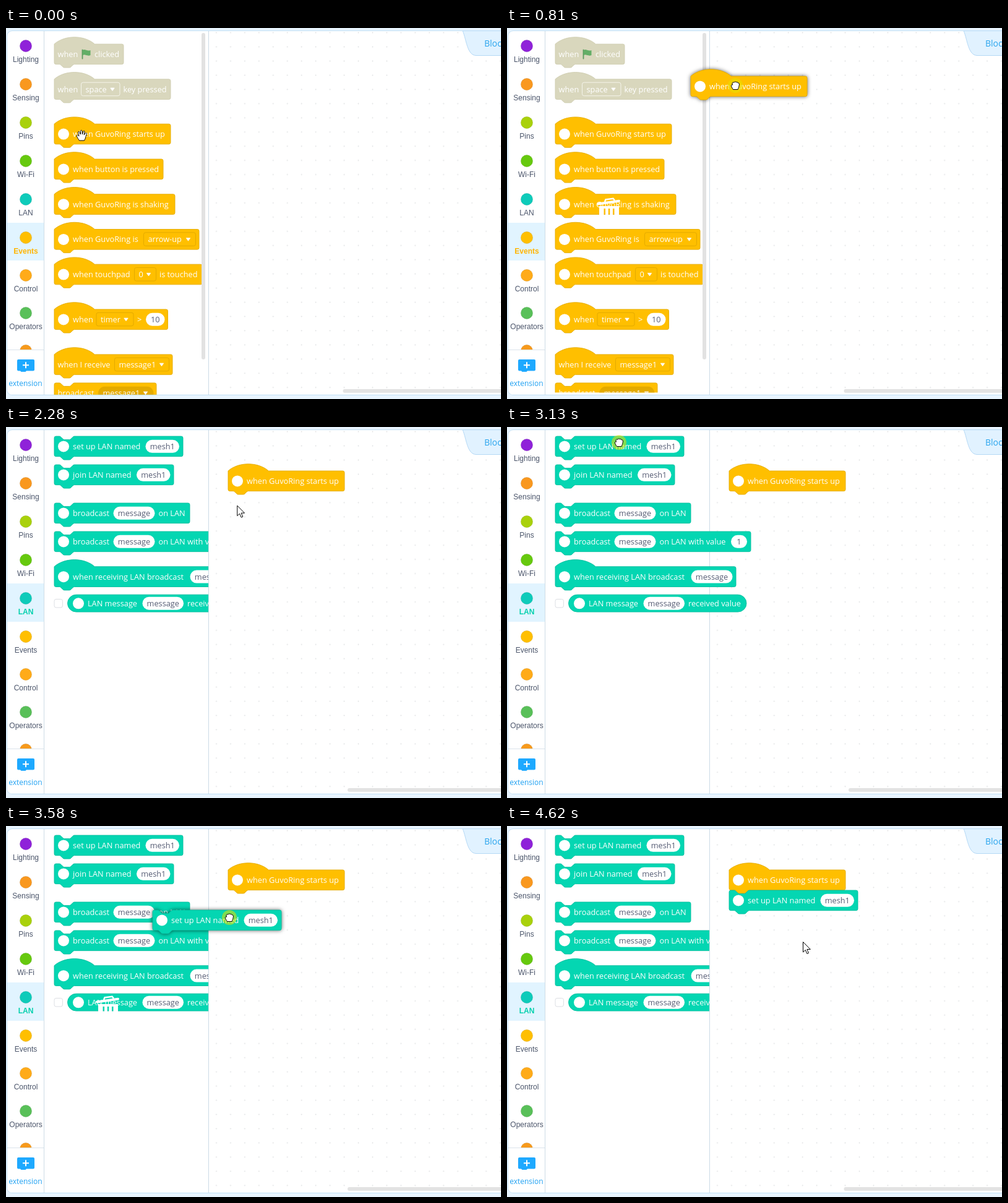
These frames come from a looping animation (800x600 px, 5.1 s). An HTML page:

```html
<!DOCTYPE html>
<html lang="en">
<head>
<meta charset="utf-8">
<title>Block editor</title>
<style>
  html, body { margin: 0; width: 100%; height: 100%; overflow: hidden; background: #e8f4fe; }
  svg { display: block; width: 800px; height: 600px; }
  text { font-family: "Open Sans", "Noto Sans", sans-serif; font-size: 12.75px; white-space: pre; }
  .label { font-family: "Liberation Sans", Arial, sans-serif; font-size: 12px; text-anchor: middle; fill: #4c566b; }
  .lifted { filter: drop-shadow(0 0 3px rgba(0, 0, 0, .6)); }
</style>
</head>
<body>
<svg id="stage" viewBox="0 0 800 600"></svg>
<script>
const LOOP = 5100;
const SCALE = 0.68;
const DEVICE = 'GuvoRing';

const YELLOW = { fill: '#ffbf00', edge: '#e3aa00', field: '#e3aa00' };
const TEAL = { fill: '#04d6b2', edge: '#04bd9d', field: '#04bd9d' };
const FADED = { fill: '#d9d7bd', edge: '#cfccb0', field: '#f5f4ea' };

// ---- block pieces; x values count from the block's left edge ----
const NOTCH_IN = 'H12c2 0 3 1 4 2l4 4c1 1 2 2 4 2h12c2 0 3-1 4-2l4-4c1-1 2-2 4-2';
const NOTCH_OUT = 'H48c-2 0-3 1-4 2l-4 4c-1 1-2 2-4 2h-12c-2 0-3-1-4-2l-4-4c-1-1-2-2-4-2';

function outline(kind, width) {
  const w = width / SCALE;
  if (kind === 'pill') return `M20.5 0H${w - 20.5}a20.5 20.5 0 0 1 0 41H20.5a20.5 20.5 0 0 1 0-41z`;
  const top = kind === 'hat' ? 'M0 0c25-22 71-22 96 0' : 'M0 4A4 4 0 0 1 4 0' + NOTCH_IN;
  return `${top}H${w - 4}a4 4 0 0 1 4 4V44a4 4 0 0 1-4 4${NOTCH_OUT}H4a4 4 0 0 1-4-4z`;
}

const write = (x, s, fill = '#fff') => `<text x="${x}" y="20.8" fill="${fill}">${s}</text>`;
const arrow = x => `<path d="M${x - 3.2} 14.2h6.4l-3.2 4.6z" fill="#fff" stroke="#fff" stroke-width=".8" stroke-linejoin="round"/>`;
const icon = (x = 15) => `<circle cx="${x}" cy="16.4" r="9" fill="#fff"/>`;
const oval = (x, w, s) =>
  `<rect x="${x}" y="5.8" width="${w}" height="21" rx="10.5" fill="#fff"/>` +
  `<text x="${x + w / 2}" y="20.8" fill="#575e75" text-anchor="middle">${s}</text>`;
const menu = (x, w, s, col = YELLOW) =>
  `<rect x="${x + .5}" y="5.3" width="${w - 1}" height="21.6" rx="3" fill="none" stroke="${col.field}"/>` +
  write(x + 7.5, s) + arrow(x + w - 12.5);
const roundMenu = (x, w, s) =>
  `<rect x="${x}" y="5.8" width="${w}" height="21.6" rx="10.8" fill="${YELLOW.field}"/>` +
  write(x + 7.5, s) + arrow(x + w - 13);
const flag =
  '<path d="M45.5 9.5v14" stroke="#5c9c5f" stroke-width="1.8" stroke-linecap="round"/>' +
  '<path d="M46 9.6c4-2 7 2.2 12.5.3v8.2c-5.500 2-8.500-2.200-12.500-.2z" fill="#63ae66"/>';

function block(kind, x, y, w, col, parts) {
  return `<g transform="translate(${x} ${y})"><path transform="scale(${SCALE})" d="${outline(kind, w)}"
    fill="${col.fill}" stroke="${col.edge}" stroke-width="1.3"/>${parts}</g>`;
}

const startUp = (x, y) => block('hat', x, y, 188, YELLOW, icon() + write(30, `when ${DEVICE} starts up`));
const setUp = (x, y) => block('stack', x, y, 208, TEAL, icon() + write(30, 'set up LAN named') + oval(147.5, 54.5, 'mesh1'));

const eventBlocks = [
  block('hat', 78, 26, 112, FADED, write(5.5, 'when') + flag + write(65, 'clicked')),
  block('hat', 78, 82.8, 188, FADED, write(5.5, 'when') + menu(43, 63.5, 'space', FADED) + write(111.5, 'key pressed')),
  startUp(78, 155.2),
  block('hat', 78, 212, 176, YELLOW, icon() + write(30, 'when button is pressed')),
  block('hat', 78, 268.8, 195, YELLOW, icon() + write(30, `when ${DEVICE} is shaking`)),
  block('hat', 78, 325.5, 234, YELLOW, icon() + write(30, `when ${DEVICE} is`) + menu(144, 85, 'arrow-up')),
  block('hat', 78, 382.2, 239, YELLOW, icon() + write(30, 'when touchpad') + menu(129, 36, '0') + write(170, 'is touched')),
  block('hat', 78, 455, 183.5, YELLOW, icon() + write(30, 'when') + menu(67.5, 61, 'timer') + write(134, '&gt;') + oval(148, 30.5, '10')),
  block('hat', 78, 528, 191, YELLOW, write(5.5, 'when I receive') + menu(97, 89, 'message1')),
  block('stack', 78, 574, 165, YELLOW, write(5.5, 'broadcast') + roundMenu(71, 89.500, 'message1'))
].join('');

const lanBlocks = [
  setUp(78, 15),
  block('stack', 78, 61, 193, TEAL, icon() + write(30, 'join LAN named') + oval(133, 54.5, 'mesh1')),
  block('stack', 78, 123, 219, TEAL, icon() + write(30, 'broadcast') + oval(95.5, 67, 'message') + write(168.500, 'on LAN')),
  block('stack', 78, 169, 316, TEAL, icon() + write(30, 'broadcast') + oval(95.5, 67, 'message') + write(168.500, 'on LAN with value') + oval(284, 26, '1')),
  block('hat', 78, 225.8, 292, TEAL, icon() + write(30, 'when receiving LAN broadcast') + oval(219.5, 67, 'message')),
  '<rect x="78" y="278.500" width="13.500" height="13.500" rx="3" fill="#fff" stroke="#dcdfe3"/>',
  block('pill', 99.5, 271.2, 287.500, TEAL,
    `<g transform="translate(0 -2.300)">${icon(17.5) + write(32.5, 'LAN message') + oval(121, 66.5, 'message') + write(193.5, 'received value')}</g>`)
].join('');

// ---- side bar ----
const categories = [
  ['Lighting', '#8f22d9'], ['Sensing', '#f9981f'], ['Pins', '#a9d10c'], ['Wi-Fi', '#66c90e'], ['LAN', '#0ecbba'],
  ['Events', '#ffbf00'], ['Control', '#ffab19'], ['Operators', '#59c059'], ['', '#f79a1c']
];
const sideBar = categories.map(([name, color], i) => {
  const y = 29 + 62 * Math.min(i, 5) + 61 * Math.max(0, i - 5);
  return `<circle cx="32" cy="${y}" r="9.700" fill="${color}" stroke="#000" stroke-opacity=".1" stroke-width=".8"/>` +
    (name && `<text class="label" id="label${name}" x="32" y="${y + 25.5}">${name}</text>`);
}).join('');

const extension =
  '<path d="M2 520H61V593H10a8 8 0 0 1-8-8z" fill="#fff"/><path d="M2 520.500H61" stroke="#dbe3ea"/>' +
  '<path d="M20 536H44a2 2 0 0 1 2 2V552.500a2 2 0 0 1-2 2H33l-1.500 1.500h-7l-1.500-1.500H20a2 2 0 0 1-2-2V538a2 2 0 0 1 2-2z" fill="#1ea9ff"/>' +
  '<path d="M27 545.300h10M32 540.300v10" stroke="#fff" stroke-width="2"/>' +
  '<text x="31.500" y="579" text-anchor="middle" fill="#22a2f2" style="font-size:12px">extension</text>';

const trash =
  '<path fill-rule="evenodd" fill="#fff" d="M149 288H181V319a2 2 0 0 1-2 2H151a2 2 0 0 1-2-2z' +
  [156.5, 163.800, 171].map(x => `M${x} 292h2.500v23h-2.500z`).join('') + '"/>' +
  '<path d="M147 284.500L181 279.700" stroke="#fff" stroke-width="4" stroke-linecap="round"/>' +
  '<path d="M158 281l1.500-3.500 12-1.700 2.500 3" fill="none" stroke="#fff" stroke-width="2.500"/>';

const pointers = {
  open: 'M-4 8C-6 5-9 1-8-.5C-7-2-5.500 0-4.500 1L-6-5C-6-7-4-7-3.500-5.500L-2.300-2L-2-7.500C-1.800-9 .3-9 .5-7.500L.8-2L2.300-6.800C3-8.300 4.900-7.600 4.500-6L3.600-1.200L6-4C7-5 8.600-4 7.800-2.500C6.500 .5 6 5 4 8Z',
  fist: 'M-3.500 6.500C-5 4-7 1.500-6.500-.5C-6-1.800-5-1.200-4.500-.8L-5-3C-5-5.500-3-5.800-2-4.600C-1.500-6.500 .8-6.600 1.200-5C2-6.200 4-5.800 4.200-4C5.500-4.500 6.600-3.500 6.400-2C6.200 1.500 5 4 4 6.500Z',
  arrow: 'M0 0V16.500L3.800 13L6.400 19L9 18L6.400 12H11.800Z'
};

const $ = id => document.getElementById(id);
$('stage').innerHTML = `
  <defs>
    <pattern id="dots" x="328.500" y="19" width="22.950" height="22.950" patternUnits="userSpaceOnUse">
      <circle cx="11.500" cy="11.500" r=".9" fill="#dcdee0"/>
    </pattern>
    <clipPath id="pane"><rect id="paneBox" x="62" y="5" width="265" height="588"/></clipPath>
  </defs>
  <path d="M800 4.500H10a8.500 8.500 0 0 0-8.500 8.500V585a8.500 8.500 0 0 0 8.500 8.500H800" fill="#fff" stroke="#c1dff5"/>
  <rect x="328" y="5" width="472" height="588" fill="url(#dots)"/>
  <path d="M738 4.500C744 18 745 44.500 760 44.500H801V4.500z" fill="#e1f2ff" stroke="#b5d9f6"/>
  <text x="773" y="29.500" fill="#2aa5ee" style="font-size:14px">Blocks</text>
  <rect id="scroll" y="584" width="300" height="6" rx="3" fill="#e3e3e3"/>
  <rect id="chosen" x="2" width="59" fill="#e1f4ff"/>
  ${sideBar}${extension}
  <path d="M61.500 5V593M327.500 5V593" stroke="#ccdbe6"/>
  <g id="yellow"></g>
  <g clip-path="url(#pane)">
    <g id="events">${eventBlocks}<rect x="316" y="8" width="6" height="528" rx="3" fill="#e2e2e2"/></g>
    <g id="lan">${lanBlocks}</g>
  </g>
  <path id="shade" d="M327.500 5H10a8 8 0 0 0-8 8V585a8 8 0 0 0 8 8H327.500z" opacity=".2"/>
  <g id="trash">${trash}</g>
  <g id="hat">${startUp(0, 0)}</g>
  <g id="stack">${setUp(0, 0)}</g>
  <g id="cursor">
    <circle id="press" r="12" fill="#e6e200" opacity=".55"/>
    <path id="pointer" fill="#fff" stroke="#000" stroke-linejoin="round"/>
  </g>`;

// ---- motion: [time, x, y], sampled at the times the screen refreshes ----
const ticks = [
  0, 160, 340, 440, 540, 630, 720, 810, 910, 1000, 1090, 1180, 1270, 1450, 1540, 1640, 1760, 1840, 1930,
  2110, 2280, 2370, 2460, 2560, 2650, 2790, 2860, 2930, 3130, 3220, 3310, 3400, 3490, 3580,
  3680, 3780, 3870, 3970, 4060, 4160, 4340, 4520, 4620
];
const cursorPath = [
  [160, 122.5, 174], [340, 134, 170], [540, 198, 150], [810, 369, 93], [1000, 396, 89], [1640, 413, 92],
  [1930, 413, 92], [2110, 432, 158], [2650, 247, 60], [2930, 181, 25], [3130, 181, 25],
  [3310, 222, 56], [3580, 361, 148], [3870, 440, 138], [4160, 472, 117], [4340, 472, 117], [4620, 478.5, 187.5]
];
const hatPath = [
  [160, 78, 155.2], [340, 86, 150], [540, 132, 132], [810, 297, 78], [1000, 332, 70],
  [1270, 351, 70], [1640, 359, 72], [1760, 359, 71]
];
const stackPath = [
  [3130, 78, 15], [3310, 108, 38], [3580, 237, 136], [3870, 325, 124], [4160, 359, 106], [4340, 359, 104]
];

function along(path, t) {
  const i = path.findIndex(p => p[0] > t);
  if (i === 0) return path[0].slice(1);
  if (i < 0) return path[path.length - 1].slice(1);
  const [t0, x0, y0] = path[i - 1], [t1, x1, y1] = path[i];
  const k = (t - t0) / (t1 - t0);
  return [x0 + (x1 - x0) * k, y0 + (y1 - y0) * k];
}

const show = (id, on) => { $(id).style.display = on ? '' : 'none'; };
const move = (id, [x, y]) => $(id).setAttribute('transform', `translate(${x} ${y})`);
const set = (id, attrs) => { for (const k in attrs) $(id).setAttribute(k, attrs[k]); };

function mark(name, on, color) {
  const s = $('label' + name).style;
  s.fill = on ? color : '';
  s.fontWeight = on ? 'bold' : '';
}

function draw(t) {
  const within = (a, b) => t >= a && t < b;
  const cursor = along(cursorPath, t);
  const lan = t >= 2110;
  const dragHat = within(340, 1760), dragStack = within(3220, 4340);
  const wide = within(2110, 3220) && cursor[0] < 327;

  show('events', !lan);
  show('lan', lan);
  set('chosen', lan ? { y: 253, height: 62 } : { y: 315, height: 61 });
  mark('Events', !lan, '#ffb400');
  mark('LAN', lan, '#04d0ae');
  set('paneBox', { width: wide ? 400 : 265, height: within(340, 2110) ? 584.5 : 588 });
  set('scroll', { x: within(1760, 4340) ? 552 : 544.5 });

  show('shade', within(340, 810) || within(3220, 3580));
  show('trash', within(340, 1000) || within(3220, 3780));
  show('hat', t >= 340);
  show('stack', t >= 3220);
  $('hat').classList.toggle('lifted', dragHat);
  $('stack').classList.toggle('lifted', dragStack);
  move('hat', along(hatPath, t));
  move('stack', along(stackPath, t));

  const shape = within(2110, 2790) || t >= 4520 ? 'arrow'
    : within(160, 1760) || within(3130, 4340) ? 'fist' : 'open';
  set('pointer', { d: pointers[shape] });
  show('press', within(160, 1540) || within(3130, 4160));
  move('cursor', cursor);
}

const begin = performance.now();
let last = -1;
function tick() {
  const t = (performance.now() - begin) % LOOP;
  const step = ticks.filter(s => s <= t).pop();
  if (step !== last) draw(last = step);
  requestAnimationFrame(tick);
}
tick();
</script>
</body>
</html>
```
